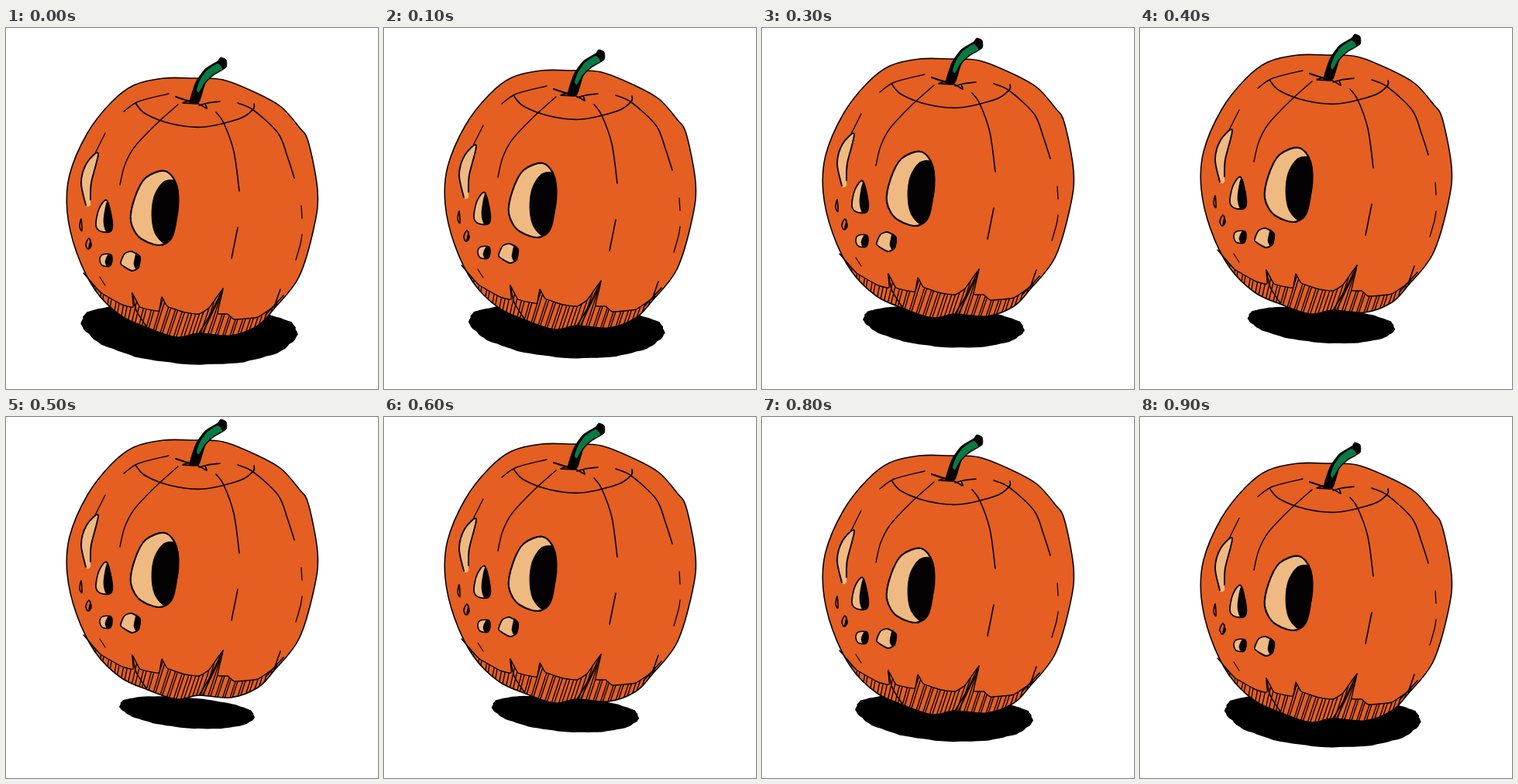
Recreate the animation shown at these times as an HTML page. Size 480 by 467 pixels, loop 1000 ms.

```html
<!DOCTYPE html>
<html lang="en">
<head>
<meta charset="utf-8">
<title>Bouncing pumpkin</title>
<style>
html, body { margin: 0; width: 100%; height: 100%; overflow: hidden; background: #fff; }
svg { display: block; width: 100vw; height: 100vh; }
</style>
</head>
<body>
<svg viewBox="0 0 480 467" stroke-linecap="round" stroke-linejoin="round">
  <defs>
    <clipPath id="skin"><path id="skinShape"/></clipPath>
    <clipPath id="rim" clip-path="url(#skin)"><path id="rimShape"/></clipPath>
  </defs>
  <path id="shadow"/>
  <g id="pumpkin"></g>
</svg>
<script>
const NS = 'http://www.w3.org/2000/svg';
const ORANGE = '#e45f21', CREAM = '#efba82', GREEN = '#087a43', INK = '#040202';
const $ = id => document.getElementById(id);
const pumpkin = $('pumpkin'), shadow = $('shadow');

const points = text => text.trim().split(/\s+/).map(pair => pair.split(',').map(Number));

// Smooth curve through points; k sets how round it is
function curve(p, closed, k = 0.16) {
  const n = p.length;
  const at = i => closed ? p[(i + n) % n] : p[Math.max(0, Math.min(n - 1, i))];
  let d = 'M' + p[0];
  for (let i = 0; i < (closed ? n : n - 1); i++) {
    const [a, b, c, e] = [at(i - 1), at(i), at(i + 1), at(i + 2)];
    const h1 = b.map((v, j) => v + (c[j] - a[j]) * k);
    const h2 = c.map((v, j) => v - (e[j] - b[j]) * k);
    d += `C${h1} ${h2} ${c}`;
  }
  return d + (closed ? 'Z' : '');
}

function add(d, fill, width, extra = {}) {
  const el = document.createElementNS(NS, 'path');
  const attrs = { d, fill, stroke: width ? INK : 'none', 'stroke-width': width, ...extra };
  for (const key in attrs) el.setAttribute(key, attrs[key]);
  pumpkin.append(el);
}
const shape = (text, fill, width = 0, k) => add(curve(points(text), true, k), fill, width);
const line = (text, width = 1.6, k) => add(curve(points(text), false, k), 'none', width);

// Body
const skin = curve(points(`242,65 203,65 165,74 136,96 105,136 82,190 79,238 91,290 115,339 148,372
  183,388 220,400 249,395 290,398 325,385 346,363 378,322 398,255 402,210 390,147 378,128
  355,102 323,84 280,67`), true);
$('skinShape').setAttribute('d', skin);
add(skin, ORANGE, 1.6);

// Shaded rim
const rim = curve(points(`100,317 122,342 150,358 164,361 163,343 173,361 197,366 201,348 208,360 231,368
  249,370 262,362 280,337 273,369 286,370 295,377 325,374 350,357`), false, 0.06);
$('rimShape').setAttribute('d', rim + 'L350,420L90,420Z');
let hatch = '';
for (let x = 90; x < 345; x += 4.8) {
  const lean = 10 + 18 * Math.min(1, Math.max(0, (x - 110) / 90));
  hatch += `M${x + Math.sin(x * 2)},402l${lean},-84`;
}
add(hatch, 'none', 1.3, { 'clip-path': 'url(#rim)' });
add(rim, 'none', 1.4);
line('163,343 168,365 181,386');
line('280,337 264,370 249,395');
line('275,350 254,394');
line('354,338 346,361');
line('358,346 335,371');
line('121,322 128,333', 1.1);

// Lid and ribs
line('167,97 180,111 214,124 255,128 302,117 319,105 320,98', 1.7);
line('152,108 171,95 210,85', 1.4);
line('222,99 192,126 165,155 153,178 147,203', 1.4);
line('271,109 281,123 294,160 301,211');
line('299,97 319,106 351,136 363,166 372,194');
line('299,258 291,298');
line('381,230 382,246', 1.3);
line('382,267 380,279 374,300', 1.3);
line('128,136 114,164', 1.3);

// Stem
line('219,89 237,95', 2.2);
line('236,94 228,97 248,98 259,104 257,98', 1.7, 0.05);
line('249,100 260,97 276,95');
shape('237,96 245,70 257,53 273,43 277,38 284,41 284,51 268,61 257,72 249,96', INK, 0.8, 0.1);
shape('246,80 250,68 259,55 273,46 279,53 267,60 256,71 249,83', GREEN, 0, 0.1);
line('241,94 243,88', 0, 0);

// Left eye, open at its lower right
const slit = '109,222 110,200 119,162 104,175 97,200 103,229';
shape(slit + ' 109,229', CREAM);
line(slit, 1.9);

// Right eye
shape('205,185 180,194 166,220 161,250 175,273 205,279 221,240 220,203', CREAM, 2.2);
shape('216,197 202,200 191,218 188,242 192,265 205,279 216,268 222,235 222,210', INK, 0.8);

// Nose
shape('130,223 120,234 116,255 122,263 135,263 137,250', CREAM, 1.8);
shape('131,224 126,248 129,263 135,263 137,250', INK, 0.6);

// Mouth
shape('97,247 95,257 98,262', ORANGE, 1.6);
shape('107,272 103,280 106,286 110,281', ORANGE, 1.7);
shape('109,273 106,286 110,281', INK);
shape('125,293 121,299 124,307 134,308 137,300 135,293', CREAM, 1.6);
shape('132,293 128,302 131,309 136,305 136,294', INK, 0.5);
shape('153,292 162,289 173,296 171,310 162,314 148,305', CREAM, 1.8, 0.1);
shape('168,291 165,305 168,312 173,304 173,296', INK, 0.6, 0.08);

// Rough-edged blob, flatter on top, deeper below as it grows
function shadowPath(size) {
  const p = [];
  for (let i = 0; i < 90; i++) {
    const a = i / 90 * 2 * Math.PI, c = Math.cos(a), s = Math.sin(a);
    const rough = 1 + 0.008 * Math.sin(a * 13) + 0.006 * Math.sin(a * 31);
    const height = s > 0 ? (72 * size - 23) * s : -28 * size * Math.pow(-s, 0.8);
    p.push([228.6 + 7.9 * size + 139 * size * c * rough, 371 + 15 * size + 7 * c + height * rough]);
  }
  return 'M' + p.join('L') + 'Z';
}

const STEPS = 10, STEP_MS = 100;

function draw(now) {
  const i = Math.floor(now / STEP_MS) % STEPS;
  const k = Math.min(i, STEPS - i);
  const lag = i > STEPS / 2 ? 5 : 0;
  const lift = Math.min(10 * k - lag, 10 + 5 * k);
  pumpkin.setAttribute('transform', `translate(0 ${-lift})`);
  shadow.setAttribute('d', shadowPath(1 - 0.1 * k + 0.005 * k * k));
}

let start = null;
function tick(now) {
  start ??= now;
  draw(Math.max(0, now - start));
  requestAnimationFrame(tick);
}
draw(0);
requestAnimationFrame(tick);
</script>
</body>
</html>
```
